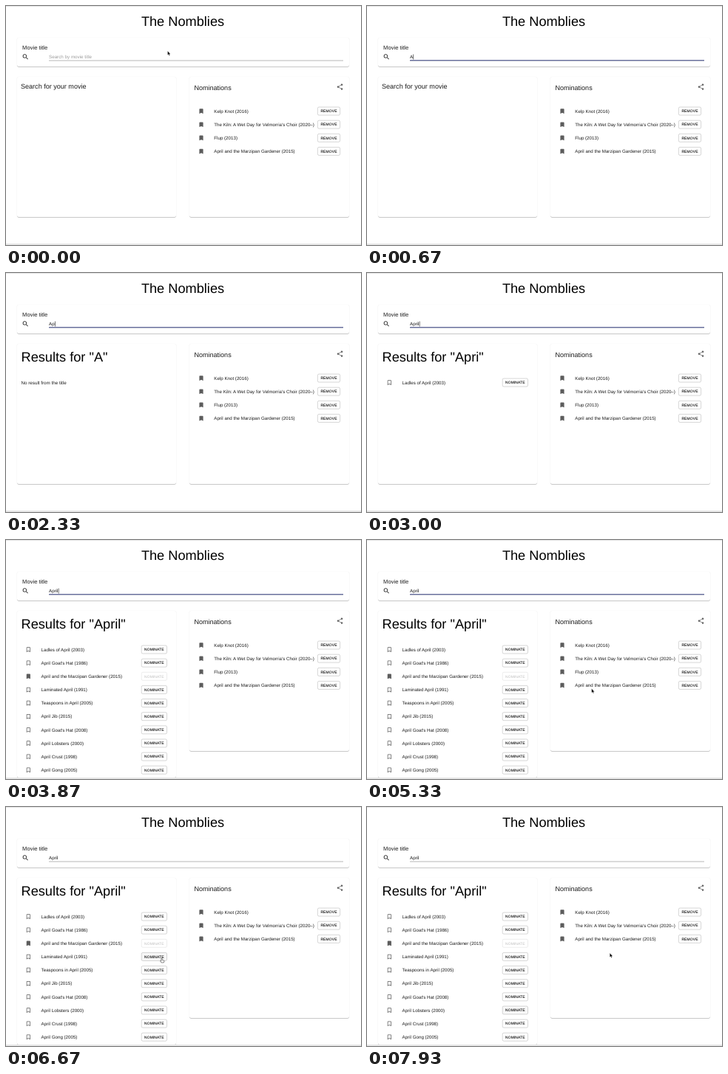
An HTML page that plays this animation: 480 by 324 pixels, repeating every 8 s.

```html
<!DOCTYPE html>
<html lang="en">
<head>
<meta charset="utf-8">
<title>Movie nominations</title>
<style>
  html, body { margin: 0; width: 100%; height: 100%; overflow: hidden; background: #fff; }
  #stage { position: relative; width: 480px; height: 324px; overflow: hidden; background: #fff; }
  .card {
    position: absolute; background: #fff; border-radius: 2px;
    box-shadow: 0 1px .5px -.5px rgba(0,0,0,.2), 0 .5px .5px rgba(0,0,0,.14), 0 .5px 1.5px rgba(0,0,0,.12);
  }
  .edge { position: absolute; left: 0; width: 480px; background: #e6e6e6; }
  svg { position: absolute; left: 0; top: 0; }
  text { font-family: "Liberation Sans", Arial, sans-serif; fill: #1c1c1c; white-space: pre; text-rendering: geometricPrecision; }
  .h3 { font-size: 18.2px; fill: #000; }
  .h6 { font-size: 9.05px; }
  .body { font-size: 6.2px; }
  .btn text { font-size: 4.93px; letter-spacing: .0286em; text-anchor: middle; stroke: #1c1c1c; stroke-width: .12; }
  .btn rect { fill: #000; fill-opacity: 0; stroke: #000; stroke-opacity: .27; stroke-width: .6; }
  .off text { fill: #bdbdbd; stroke: none; }
  .off rect { stroke-opacity: .13; }
  .icon { fill: #5c5c5c; }
</style>
</head>
<body>
<div id="stage">
  <div class="card" style="left:14.5px;top:43px;width:449px;height:39px"></div>
  <div class="card" id="leftCard" style="left:14.5px;top:96px;width:215.5px;height:190px"></div>
  <div class="card" style="left:248px;top:96px;width:215.5px;height:190px"></div>
  <div class="edge" style="top:0;height:1px"></div>
  <div class="edge" style="top:322px;height:2px"></div>
  <svg width="480" height="324" viewBox="0 0 480 324">
    <text class="h3" x="239" y="27" text-anchor="middle">The Nomblies</text>
    <text x="22.1" y="58.8" font-size="7.6">Movie title</text>
    <path fill="#222" transform="translate(21.4 64) scale(.41)" d="M15.5 14h-.79l-.28-.27A6.47 6.47 0 0 0 16 9.5 6.5 6.5 0 1 0 9.5 16c1.61 0 3.09-.59 4.23-1.57l.27.28v.79l5 4.99L20.49 19zm-6 0a4.5 4.5 0 1 1 0-9 4.5 4.5 0 0 1 0 9z"/>
    <text id="hint" x="58" y="70.7" font-size="6.25" style="fill:#9c9c9c">Search by movie title</text>
    <text id="field" x="58" y="70.7" font-size="6.25"></text>
    <rect id="caret" y="65.5" width=".6" height="7" fill="#111"/>
    <rect x="58" y="73.7" width="398" height=".6" fill="#888"/>
    <rect id="focusLine" x="-199" y="73.3" width="398" height=".95" fill="#3b4589"/>

    <text id="intro" class="h6" x="20" y="112.4">Search for your movie</text>
    <text id="heading" class="h3" x="20.5" y="119.6"></text>
    <text id="empty" x="20.5" y="151.3" font-size="6.25">No result from the title</text>
    <g id="results"></g>

    <text class="h6" x="254.4" y="114.2">Nominations</text>
    <path class="icon" transform="translate(446.5 104.6) scale(.42)" d="M18 16.08c-.76 0-1.44.3-1.96.77L8.91 12.7a3.3 3.3 0 0 0 0-1.4l7.05-4.11A3 3 0 1 0 15 5c0 .24.04.47.09.7L8.04 9.81a3 3 0 1 0 0 4.38l7.12 4.16c-.05.21-.08.43-.08.65a2.92 2.92 0 1 0 2.92-2.92z"/>
    <g id="picks"></g>

    <g id="cursor">
      <path id="arrow" d="M0 0V5.6L1.3 4.5 2.1 6.5 3 6.1 2.2 4.2H3.9Z" fill="#000" stroke="#fff" stroke-width=".3"/>
      <path id="beam" d="M-1 0Q0 0 0 .8Q0 0 1 0M0 .8V5.6M-1 6.4Q0 6.4 0 5.6Q0 6.4 1 6.4" fill="none" stroke="#222" stroke-width=".6"/>
      <path id="hand" transform="scale(.9)" d="M-.7 .4Q0-.5.7.4V2.6L3 3.1Q3.9 3.4 3.8 4.4L3.2 6.6H-.6L-2.2 4.2Q-2 3.2-.7 4Z" fill="#fff" stroke="#111" stroke-width=".55"/>
    </g>
  </svg>
</div>
<script>
const LOOP = 8000, STEP = 200 / 3, ROW = 18.14;
const $ = id => document.getElementById(id);
const show = (el, on) => el.setAttribute('visibility', on ? 'inherit' : 'hidden');

const SAVED = 'M17 3H7c-1.1 0-2 .9-2 2v16l7-3 7 3V5c0-1.1-.9-2-2-2z';
const UNSAVED = SAVED + 'm0 15l-5-2.18L7 18V5h10v13z';

const titles = [
  'Ladles of April (2003)', "April Goat's Hat (1986)", 'April and the Marzipan Gardener (2015)',
  'Laminated April (1991)', 'Teaspoons in April (2005)', 'April Jib (2015)', "April Goat's Hat (2008)",
  'April Lobsters (2000)', 'April Crust (1998)', 'April Gong (2005)'
];
const nominated = [
  'Kelp Knot (2016)', "The Kiln: A Wet Day for Velmorria's Choir (2020–)", 'Flup (2013)', titles[2]
];

function addRow(parent, i, title, o) {
  const g = document.createElementNS('http://www.w3.org/2000/svg', 'g');
  g.innerHTML = `
    <path class="icon" transform="translate(${o.icon - 4.44} -4.3) scale(.37)" d="${o.saved ? SAVED : UNSAVED}"/>
    <text class="body" x="${o.text}" y="2.2">${title}</text>
    <g class="btn${o.off ? ' off' : ''}">
      <rect x="${o.btn}" y="-5.5" width="${o.width}" height="11" rx="1.8"/>
      <text x="${o.btn + o.width / 2}" y="1.8">${o.label}</text>
    </g>`;
  parent.append(g);
  const row = { g, tint: g.querySelector('rect'), place: n => g.setAttribute('transform', `translate(0 ${o.top + ROW * n})`) };
  row.place(i);
  return row;
}

const results = titles.map((title, i) => addRow($('results'), i, title,
  { top: 148.5, icon: 30.3, text: 47.6, btn: 183.2, width: 34.3, label: 'NOMINATE', saved: i === 2, off: i === 2 }));
const picks = nominated.map((title, i) => addRow($('picks'), i, title,
  { top: 142.5, icon: 264, text: 281.3, btn: 421.4, width: 30.2, label: 'REMOVE', saved: true }));

// [start time, value], held until the next entry
const typed = [[0, ''], [670, 'A'], [800, 'Ap'], [930, 'Apr'], [1470, 'Ap'], [1600, 'A'],
  [2330, 'Ap'], [2670, 'Apr'], [2730, 'Apri'], [2800, 'April']];
const searched = [[0, ''], [1530, 'Ap'], [1930, 'A'], [2470, 'Ap'], [2930, 'Apri'], [3870, 'April']];
const caretOn = [[0, 0], [270, 1], [1130, 0], [1470, 1], [2130, 0], [2330, 1], [3330, 0], [3870, 1],
  [4330, 0], [4800, 1], [5330, 0], [5870, 1], [6130, 0]];
const pointer = [[0, 'arrow'], [130, 'beam'], [670, ''], [4600, 'beam'], [4670, 'arrow'], [5800, 'hand'],
  [6270, 'arrow'], [6600, 'hand'], [7800, 'arrow']];
const track = [[0, 218.5, 61], [4600, 218.5, 61], [5000, 303.7, 201.5], [5330, 303.7, 201.5], [5870, 434, 181],
  [6200, 434, 181], [6670, 210.5, 205], [6930, 207, 278], [7000, 207, 278], [7130, 206.8, 280.5],
  [7730, 206.8, 280.5], [7930, 328.3, 198]];

const held = (list, t) => list.findLast(e => e[0] <= t)[1];
const ramp = (t, a, b) => Math.min(1, Math.max(0, (t - a) / (b - a)));
const easeOut = p => 1 - (1 - p) ** 3;
const smooth = p => p * p * (3 - 2 * p);
const hover = (t, from, to) => .06 * ramp(t, from, from + 130) * (1 - ramp(t, to, to + 250));

function position(t) {
  const i = track.findLastIndex(k => k[0] <= t), a = track[i], b = track[i + 1];
  if (!b) return [a[1], a[2]];
  const p = smooth(ramp(t, a[0], b[0]));
  return [a[1] + (b[1] - a[1]) * p, a[2] + (b[2] - a[2]) * p];
}

function draw(t) {
  const text = held(typed, t), query = held(searched, t);
  const field = $('field');
  field.textContent = text;
  show($('hint'), !text);
  $('caret').setAttribute('x', 58.3 + (text ? field.getComputedTextLength() : 0));
  show($('caret'), held(caretOn, t));
  const focus = easeOut(ramp(t, 130, 330)) * (1 - easeOut(ramp(t, 6130, 6330)));
  $('focusLine').setAttribute('transform', `translate(257 0) scale(${focus} 1)`);

  const count = query === 'April' ? titles.length : query === 'Apri' ? 1 : 0;
  show($('intro'), !query);
  $('heading').textContent = query && `Results for "${query}"`;
  show($('empty'), query && !count);
  results.forEach((r, i) => show(r.g, i < count));
  $('leftCard').style.height = (count > 1 ? 226 : 190) + 'px';

  const removed = t >= 6200;
  show(picks[2].g, !removed);
  picks[3].place(removed ? 2 : 3);
  picks[2].tint.style.fillOpacity = hover(t, 5800, 6270);
  picks[3].tint.style.fillOpacity = removed ? hover(t, 5800, 6270) : 0;
  results[3].tint.style.fillOpacity = hover(t, 6600, 6730);
  results[7].tint.style.fillOpacity = hover(t, 6870, 7800);

  const shape = held(pointer, t);
  for (const id of ['arrow', 'beam', 'hand']) show($(id), id === shape);
  $('cursor').setAttribute('transform', `translate(${position(t)})`);
}

function tick() {
  // 15 pictures a second, with times rounded to 10 ms
  const step = Math.floor((performance.now() % LOOP + 5) / STEP);
  draw(Math.round(step * STEP / 10) * 10 % LOOP);
  requestAnimationFrame(tick);
}
tick();
</script>
</body>
</html>
```
